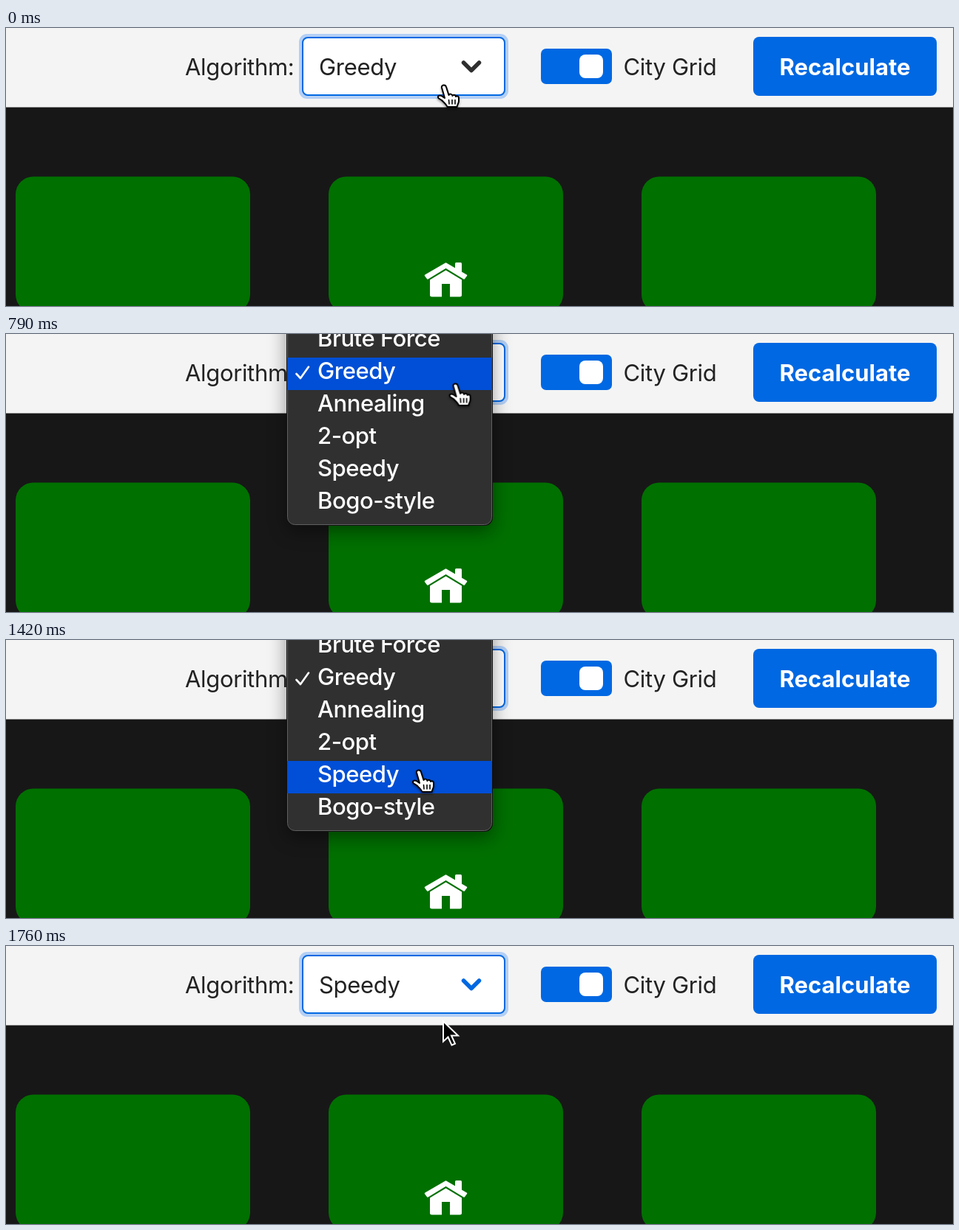
These frames come from a looping animation (1280x377 px, 1800 ms). An HTML page:

```html
<!DOCTYPE html>
<html lang="en">
<head>
<meta charset="utf-8">
<title>Algorithm picker</title>
<style>
  html, body { margin: 0; width: 100%; height: 100%; overflow: hidden; background: #171717; }
  svg { display: block; width: 100%; height: 100%; }
  text {
    font: 400 31px Inter, "Liberation Sans", sans-serif;
    font-optical-sizing: none;
    letter-spacing: -.01em;
    fill: #222;
  }
  .button { font-weight: 700; letter-spacing: 0; fill: #fff; text-anchor: middle; }
  .menu text { font-weight: 500; letter-spacing: -.015em; fill: #fff; }
  .card { fill: #007000; }
  .blue { fill: #0068e2; }
  .line { fill: none; stroke-linecap: round; stroke-linejoin: round; }
  .shadow { filter: drop-shadow(0 8px 12px rgba(0, 0, 0, .4)); }

  .pointer, .menu, .highlight, .ring, .hand, .arrow, .before, .after, .chevron {
    animation: 1800ms linear infinite;
  }
  .pointer { animation-name: move; }
  .menu { animation-name: menu; }
  .highlight { animation-name: highlight; animation-timing-function: step-end; }
  .ring { animation-name: press; animation-timing-function: step-end; }
  .hand, .before { animation-name: leave; animation-timing-function: step-end; }
  .arrow, .after { animation-name: enter; animation-timing-function: step-end; }
  .chevron { animation-name: tint; animation-timing-function: step-end; }

  @keyframes move {
    0% { transform: translate(591px, 77px); animation-timing-function: ease-in-out; }
    21% { transform: translate(611px, 58px); }
    30% { transform: translate(611px, 58px); animation-timing-function: ease-in; }
    43.889% { transform: translate(607px, 66px); animation-timing-function: cubic-bezier(.3, .3, .4, 1); }
    51.111% { transform: translate(557px, 173px); animation-timing-function: ease-out; }
    60%, 84% { transform: translate(557px, 176px); animation-timing-function: ease-in; }
    90% { transform: translate(565px, 171px); animation-timing-function: cubic-bezier(.4, .2, .5, 1); }
    97.778%, 100% { transform: translate(591px, 101px); }
  }
  @keyframes menu {
    0%, 23.5% { opacity: 0; }
    23.51%, 85.56% { opacity: 1; }
    91.11%, 100% { opacity: 0; }
  }
  @keyframes highlight {
    0% { transform: none; }
    44.6% { transform: translateY(44px); }
    46.4% { transform: translateY(88px); }
    49.2%, 100% { transform: translateY(132px); }
  }
  @keyframes press {
    0% { opacity: 0; }
    21.7% { opacity: 1; }
    29% { opacity: 0; }
    80.8% { opacity: 1; }
    84.7%, 100% { opacity: 0; }
  }
  @keyframes leave {
    0% { opacity: 1; }
    91.8%, 100% { opacity: 0; }
  }
  @keyframes enter {
    0% { opacity: 0; }
    91.8%, 100% { opacity: 1; }
  }
  @keyframes tint {
    0% { stroke: #2f2f2f; }
    91.8%, 100% { stroke: #0068e2; }
  }
</style>
</head>
<body>
<svg viewBox="0 0 1280 377">
  <rect width="1280" height="377" fill="#171717"/>
  <rect width="1280" height="107.500" fill="#f4f4f4"/>

  <rect class="card" x="13" y="201.500" width="317" height="184" rx="24"/>
  <rect class="card" x="436" y="201.500" width="317" height="184" rx="24"/>
  <rect class="card" x="859" y="201.500" width="317" height="184" rx="24"/>

  <g fill="#fff">
    <path d="M607 319.500q0-1.500 1.500-1.500h6q1.500 0 1.500 1.500V332l-9-6z"/>
    <path d="M594.500 319.500 567 335.500 570 339.500 594.500 324.500 619 339.500 622 335.500z"
          stroke="#fff" stroke-width="2.500" stroke-linejoin="round"/>
    <path d="M594.500 328.500 616 341.500V362q0 2.500-2.500 2.500H600V347H589v17.500H575.500q-2.500 0-2.500-2.500V341.500z"/>
  </g>

  <text x="242" y="63.500">Algorithm:</text>
  <rect x="396" y="8" width="283" height="88" rx="11" fill="#b3cff5"/>
  <rect x="401" y="13" width="273" height="78" rx="7" fill="#fff" stroke="#0068e2" stroke-width="2"/>
  <text class="before" x="423" y="63.500">Greedy</text>
  <text class="after" x="423" y="63.500">Speedy</text>
  <path class="line chevron" d="M618.500 47 629 57.500 639.500 47" stroke-width="5.500"/>

  <rect class="blue" x="723" y="28" width="96" height="48" rx="7"/>
  <rect x="775" y="36" width="32" height="32" rx="8" fill="#fff"/>
  <text x="834.500" y="63.500">City Grid</text>

  <rect class="blue" x="1010" y="12" width="248" height="80" rx="8"/>
  <text class="button" x="1134" y="63.500">Recalculate</text>

  <g class="menu">
    <rect class="shadow" x="379" y="-60" width="279" height="320" rx="11" fill="#111"/>
    <rect x="380.500" y="-60" width="276" height="318.500" rx="10" fill="#303030" stroke="#606060"/>
    <rect class="highlight" x="380" y="32" width="277" height="44" fill="#004fd6"/>
    <path class="line" d="M392.500 54 398 60 409 44.500" stroke="#fff" stroke-width="2.600"/>
    <g transform="translate(421 17.300)">
      <text>Brute Force</text>
      <text y="44">Greedy</text>
      <text y="88">Annealing</text>
      <text y="132">2-opt</text>
      <text y="176">Speedy</text>
      <text y="220">Bogo-style</text>
    </g>
  </g>

  <g class="pointer">
    <g class="ring" fill="none">
      <circle cx="1" cy="-.5" r="60" stroke="#fff" stroke-width="5"/>
      <circle cx="1" cy="-.5" r="60.500" stroke="#000" stroke-width="2.500"/>
    </g>
    <g class="hand" style="filter: drop-shadow(0 2px 1.500px rgba(0, 0, 0, .4))">
      <path d="M-2 4C-3 0 3-1 4 3L7.500 14C8.500 12 12 12 12.500 15 13.500 13 16.500 13.500 17 16 18.500 14.500 21 15.500 21 18V22C21 25 19 27 18.500 30H5.500C4.500 27 1 24-2 21L-6 18.500C-8.500 16-6 13.500-2.500 15L2 18z"
            fill="#fff" stroke="#000" stroke-width="2" stroke-linejoin="round"/>
      <path class="line" d="M7.500 20.500 8 26M12 20.500V26M16 20.500V26" stroke="#000" stroke-width="1.600"/>
    </g>
    <path class="arrow" d="M0 1V28.500L6.500 22.500 11.500 33.500 16 31.500 11 20.500H20z"
          fill="#000" stroke="#fff" stroke-width="2"/>
  </g>
</svg>
</body>
</html>
```
